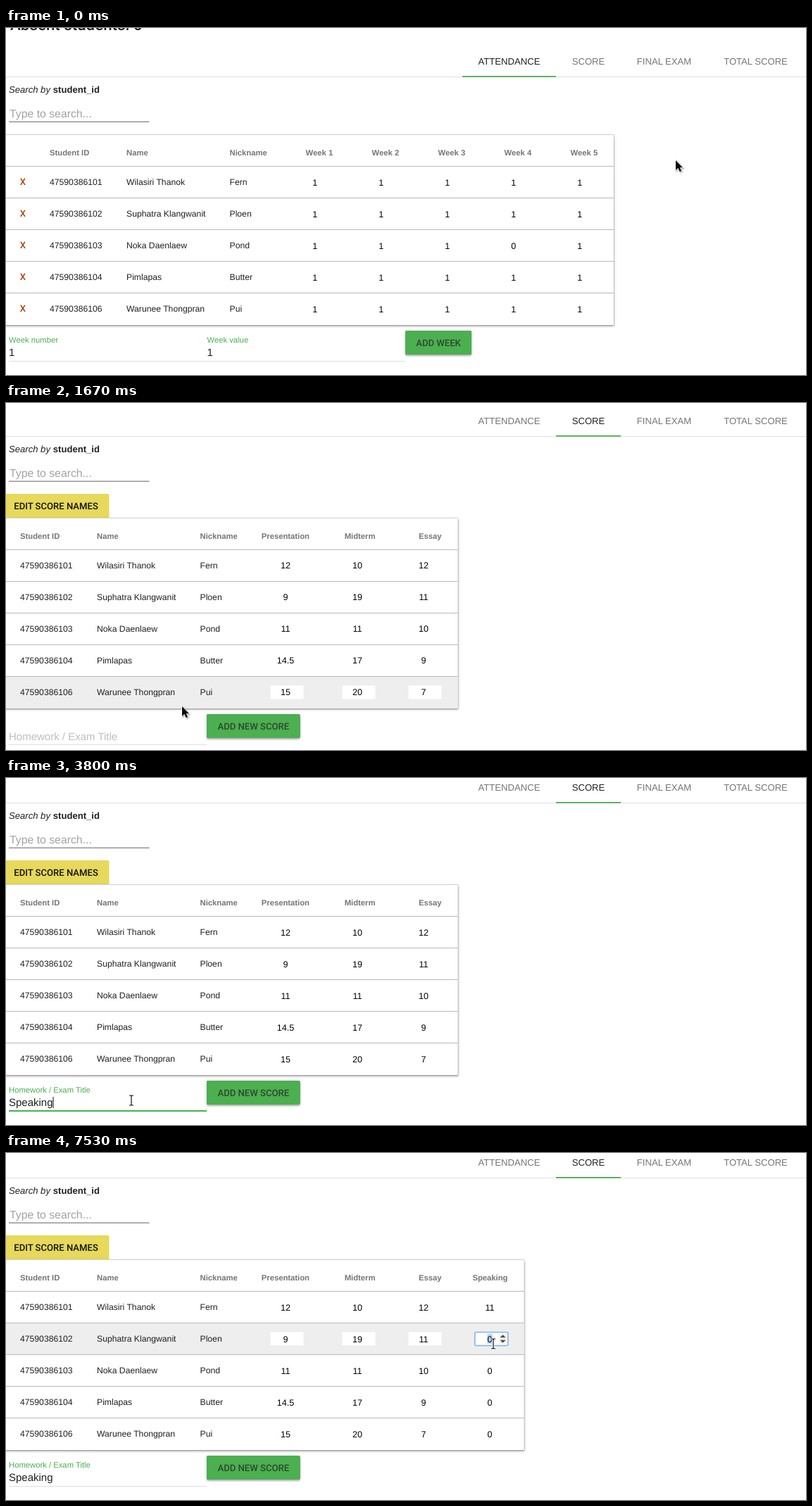
An HTML page with a canvas that plays this animation: 1136x493 px, repeating every 8 s.

```html
<!DOCTYPE html>
<html lang="en">
<head>
<meta charset="utf-8">
<title>Score sheet</title>
<style>
html, body { margin: 0; width: 100%; height: 100%; overflow: hidden; background: #fff; }
canvas { display: block; width: 1136px; height: 493px; }
</style>
</head>
<body>
<canvas id="stage" width="1136" height="493"></canvas>
<script>
const ctx = document.getElementById('stage').getContext('2d');
const LOOP = 8000, SCROLL = 34, ROW = 45, LAG = 250;
const WEEK_TOP = 152, SCORE_TOP = 186;
const SANS = '"Liberation Sans", Arial, sans-serif';
const ROBOTO = 'Roboto, sans-serif';
const GREEN = '#4caf50', INK = '#212121', GREY = '#757575';

const T = { tab: 770, scroll: 1545, field: 2030, blur: 4780, added: 4900, digits: 6200 };

// start, duration, x, y: each move eases on from where the last one ended
const moves = [
  [270, 410, 828, 54], [950, 250, 306, 354], [1200, 220, 250, 431],
  [1700, 230, 178, 458], [4400, 320, 342, 448], [4900, 860, 690, 219],
  [5840, 160, 678, 219], [6300, 320, 690, 255], [7200, 330, 692, 271]
];
// letters, start, time per letter
const bursts = [['S', 2930, 0], ['peak', 3200, 110], ['ing', 3670, 65]];

const student = (n, name, nick, ...scores) => ({ info: ['4759038610' + n, name, nick], scores });
const students = [
  student(1, 'Wilasiri Thanok', 'Fern', 12, 10, 12),
  student(2, 'Suphatra Klangwanit', 'Ploen', 9, 19, 11),
  student(3, 'Noka Daenlaew', 'Pond', 11, 11, 10),
  student(4, 'Pimlapas', 'Butter', 14.5, 17, 9),
  student(6, 'Warunee Thongpran', 'Pui', 15, 20, 7)
];
const column = (title, x, right = x + 25.5) => ({ title, x, right });
const weekCols = [0, 1, 2, 3, 4].map(i => column('Week ' + (i + 1), 438.7 + 94 * i));
const scoreCols = ['Presentation', 'Midterm', 'Essay', 'Speaking'].map((title, i) =>
  i ? column(title, 405 + 94 * i) : column(title, 397, 431));
const tabs = [['ATTENDANCE', 648, 133], ['SCORE', 781, 92], ['FINAL EXAM', 873, 123], ['TOTAL SCORE', 996, 137]];

const clamp = v => Math.max(0, Math.min(1, v));
const mix = (a, b, k) => a + (b - a) * k;
const ramp = (t, from, length) => clamp((t - from) / length);
const smooth = k => k * k * (3 - 2 * k);
const easeOut = k => 1 - (1 - k) ** 3;
const within = (v, a, b) => v >= a && v < b;

const scrollAt = t => SCROLL * smooth(ramp(t, T.scroll, 210));
const focusedRow = t => within(t, 5800, 6550) ? 0 : t >= 7270 ? 1 : -1;

function cursorAt(t) {
  let x = 951, y = 188;
  for (const [start, length, toX, toY] of moves) {
    const k = smooth(ramp(t, start, length));
    x = mix(x, toX, k);
    y = mix(y, toY, k);
  }
  return { x, y };
}

function typedAt(t) {
  return bursts.map(([letters, start, step]) =>
    [...letters].filter((c, i) => t >= start + i * step).join('')).join('');
}

function text(str, x, y, size, color, align = 'left', weight = '', family = SANS) {
  ctx.font = `${weight} ${size}px ${family}`;
  ctx.textAlign = align;
  ctx.fillStyle = color;
  ctx.fillText(str, x, y);
}

function rect(x, y, w, h, color) {
  ctx.fillStyle = color;
  ctx.fillRect(x, y, w, h);
}

function roundRect(x, y, w, h, r, color) {
  ctx.fillStyle = color;
  ctx.beginPath();
  ctx.roundRect(x, y, w, h, r);
  ctx.fill();
}

function raised(x, y, w, h, r, color) {
  ctx.save();
  for (const [dy, blur, alpha] of [[1, 4.7, .2], [2, 2, .2]]) {
    ctx.shadowColor = `rgba(0,0,0,${alpha})`;
    ctx.shadowOffsetY = dy;
    ctx.shadowBlur = blur;
    roundRect(x, y, w, h, r, color);
  }
  ctx.restore();
}

function button(label, x, y, w) {
  raised(x, y, w, 34, 2, GREEN);
  text(label, x + w / 2, y + 22, 13.1, '#2f4630', 'center', 500, ROBOTO);
}

function drawHeader(t, seen) {
  text('Absent students: 0', 6, 3, 22.3, INK, 'left', 500, ROBOTO);
  rect(0, 69, 1136, 1, '#e0e0e0');
  const active = t < T.tab ? 0 : 1;
  tabs.forEach(([name, x, w], i) => {
    if (onTab(seen) && within(seen.x, x, x + w)) rect(x, 24, w, 45, '#f1f8f1');
    text(name, x + w / 2, 52, 13.1, i === active ? INK : GREY, 'center');
  });
  const k = smooth(ramp(t, T.tab, 280));
  rect(mix(648, 781, k), 68, mix(133, 92, k), 1.8, GREEN);

  text('Search by ', 4, 92, 13.1, INK, 'left', 'italic');
  text('student_id', 66.8, 92, 13.1, INK, 'left', 'bold');
  text('Type to search...', 5, 127, 15.8, '#a3a3a3');
  rect(4, 132.6, 199.5, 1.4, '#8e8e8e');
}

function drawInput(x, y, value, focused, selected, spinner) {
  rect(x - 21.5, y - 9.5, 47, 19, '#fff');
  if (focused) {
    ctx.strokeStyle = '#8dbbee';
    ctx.lineWidth = 1.8;
    ctx.beginPath();
    ctx.roundRect(x - 21.2, y - 9.3, 47, 19, 1.5);
    ctx.stroke();
  }
  if (selected) rect(x - 3.6, y - 7, 7.4, 14, '#b5d5f8');
  if (spinner) {
    rect(x + 13.5, y - 6.5, 10, 13, '#f0f0f0');
    ctx.fillStyle = '#4a4a4a';
    for (const d of [-1, 1]) {
      ctx.beginPath();
      ctx.moveTo(x + 14.5, y + d * 1.7);
      ctx.lineTo(x + 22.5, y + d * 1.7);
      ctx.lineTo(x + 18.5, y + d * 5.8);
      ctx.fill();
    }
  }
  text(value, x, y + 4.5, 12.5, '#000', 'center');
}

function drawTable(top, right, infoX, cols, seen, drawCell) {
  rect(0, top - 1, right + 1, 272, '#dedede');
  raised(-20, top, right + 20, 270, 0, '#fff');
  const hover = seen.x < right ? Math.floor((seen.y - top - 45) / ROW) : -1;
  if (within(hover, 0, students.length)) rect(0, top + 45 + hover * ROW, right, ROW, '#eee');

  ['Student ID', 'Name', 'Nickname'].forEach((s, i) =>
    text(s, infoX + [0, 109, 255.5][i], top + 29, 11.27, GREY, 'left', 'bold'));
  for (const c of cols) text(c.title, c.right, top + 29, 11.27, GREY, 'right', 'bold');

  students.forEach((s, r) => {
    const y = top + 67 + r * ROW;
    rect(0, y - 23, right, 1, '#bababa');
    s.info.forEach((v, i) => text(v, infoX + [0, 109, 255.5][i], y + 4, 12.2, INK));
    cols.forEach((c, i) => drawCell(c, i, r, y, r === hover));
  });
}

function drawAttendance(seen) {
  drawTable(WEEK_TOP, 863, 62, weekCols, seen, (col, i, r, y) => {
    if (i === 0) text('X', 24, y + 4, 13.1, '#a8440f', 'center', 500, ROBOTO);
    drawInput(col.x, y, r === 2 && i === 3 ? 0 : 1);
  });
  for (const [label, x] of [['Week number', 4], ['Week value', 285.5]]) {
    text(label, x, 447, 11.27, GREEN);
    text('1', x, 466, 15, INK);
  }
  rect(4, 473, 563, 1, '#dedede');
  button('ADD WEEK', 567, 430, 94);
}

function drawTitleField(t) {
  const k = easeOut(ramp(t, T.field, 300));
  const [r, g, b] = [76, 175, 80].map(c => Math.round(mix(190, c, k)));
  text('Homework / Exam Title', 4, mix(500.7, 481, k), mix(15, 11.27, k), `rgb(${r},${g},${b})`);
  rect(4, 507, 281, 1, '#dedede');
  const typed = typedAt(t);
  text(typed, 4, 500, 15, INK);
  const line = 281 * k * (1 - easeOut(ramp(t, T.blur, 250)));
  rect(144.5 - line / 2, 506, line, 2, GREEN);
  if (within(t, T.field + 40, T.blur)) rect(4 + ctx.measureText(typed).width, 487, 1, 16, '#111');
}

function drawScores(t, seen) {
  roundRect(-4, 151, 150.5, 34.5, 2, '#e6d95b');
  text('EDIT SCORE NAMES', 11.3, 173, 13.1, '#111', 'left', 500, ROBOTO);
  const added = t >= T.added;
  const entry = '11'.slice(0, Math.ceil((t - T.digits) / 140));
  const cols = added ? scoreCols : scoreCols.slice(0, 3);
  drawTable(SCORE_TOP, added ? 735.5 : 641.5, 20, cols, seen, (col, i, r, y, hovered) => {
    if (i < 3) return drawInput(col.x, y, students[r].scores[i]);
    const focused = r === focusedRow(t);
    const selected = focused && (r ? t >= 7400 : within(t, 5900, T.digits));
    const spinner = focused || (hovered && Math.abs(seen.x - col.x) < 24);
    drawInput(col.x, y, r === 0 && t > T.digits ? entry : 0, focused, selected, spinner);
  });
  drawTitleField(t);
  button('ADD NEW SCORE', 285, 464, 132.5);
}

function drawStatus() {
  roundRect(-4, 479, 600, 20, 3, '#dcdcdc');
  text('board.test/marks#', 0, 494, 14, '#555', 'left', '', '"Noto Sans", sans-serif');
}

const onTab = p => within(p.y, 24, 69) && p.x > 648;

function overText(t, x, y) {
  if (t < T.tab) return false;
  if (x < 285 && within(y, 474, 508)) return true;
  const inRow = (y - SCORE_TOP - 45) % ROW;
  return t > T.added && Math.abs(x - 689) < 24 && within(inRow, 12, 33);
}

function drawBeam() {
  const shape = new Path2D('M-3-7H-1L0-6L1-7H3M0-6V6M-3 7H-1L0 6L1 7H3');
  for (const [color, width] of [['#fff', 3], ['#111', 1.2]]) {
    ctx.strokeStyle = color;
    ctx.lineWidth = width;
    ctx.stroke(shape);
  }
}

function drawArrow() {
  const shape = new Path2D('M0 0V14L3.3 11L5.7 16.2L8.2 15L5.8 10.2H10Z');
  ctx.shadowColor = 'rgba(0,0,0,.4)';
  ctx.shadowBlur = 2;
  ctx.shadowOffsetX = ctx.shadowOffsetY = 1;
  ctx.strokeStyle = '#fff';
  ctx.lineWidth = 1.6;
  ctx.stroke(shape);
  ctx.shadowColor = 'transparent';
  ctx.fillStyle = '#0a0a0a';
  ctx.fill(shape);
}

function draw(t) {
  const scroll = scrollAt(t);
  const cursor = cursorAt(t);
  // hover effects trail the pointer
  const seen = cursorAt(t - LAG);
  seen.y += scroll;

  rect(0, 0, 1136, 493, '#fff');
  ctx.save();
  ctx.translate(0, -scroll);
  drawHeader(t, seen);
  if (t < T.tab) drawAttendance(seen);
  else drawScores(t, seen);
  ctx.restore();
  if (onTab(seen)) drawStatus();

  ctx.save();
  ctx.translate(cursor.x, cursor.y);
  if (overText(t, cursor.x, cursor.y + scroll)) drawBeam();
  else drawArrow();
  ctx.restore();
}

ctx.textRendering = 'geometricPrecision';
const start = performance.now();
function tick() {
  draw((performance.now() - start) % LOOP);
  requestAnimationFrame(tick);
}
tick();
</script>
</body>
</html>
```
